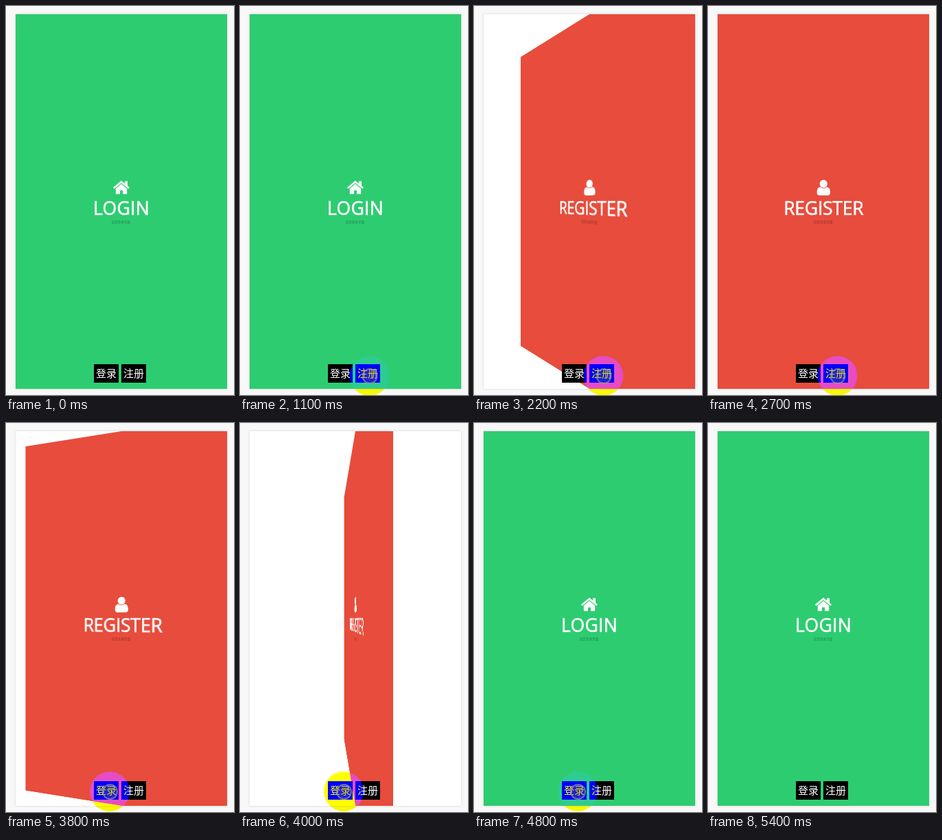
An HTML page for the animation above (6 s loop, 332x568 px).

```html
<!DOCTYPE html>
<html lang="zh">
<head>
<meta charset="utf-8">
<title>Flip card</title>
<style>
  html, body { margin: 0; width: 100%; height: 100%; overflow: hidden; }

  .stage {
    position: relative; width: 332px; height: 568px;
    overflow: hidden; isolation: isolate; background: #f8f8f8;
  }

  .card {
    position: absolute; left: 14px; top: 12px; width: 308px; height: 547px;
    overflow: hidden; perspective: 280px; background: #fff;
    box-shadow: 0 0 3px rgba(0, 0, 0, .16);
  }
  .flipper, .face { position: absolute; inset: 0; }
  .flipper { transform-style: preserve-3d; }
  .face { backface-visibility: hidden; }
  .login { background: #2ecc71; }
  .register { background: #e74c3c; transform: rotateY(180deg); }

  svg { display: block; width: 308px; height: 547px; fill: #fff; }
  text { text-anchor: middle; }
  .title { font: 26.5px "Open Sans", "Noto Sans", sans-serif; stroke: #fff; stroke-width: .6px; }
  .login .title { letter-spacing: .25px; }
  .register .title { letter-spacing: -.25px; }
  .note { font: 4.7px "Noto Sans CJK SC", "Noto Sans CJK", sans-serif; fill: rgba(0, 0, 0, .32); }

  .btn {
    position: absolute; top: 523px; width: 36px; height: 27px;
    background: #000; color: #fff; text-align: center; white-space: nowrap;
    font: 500 15px/26px "Noto Sans CJK SC", "Noto Sans CJK", sans-serif;
  }

  .halo, .ring { position: absolute; border-radius: 50%; box-sizing: border-box; }
  /* Difference with blue: yellow on white, magenta on red, blue on black */
  .halo {
    left: -29px; top: -29px; width: 58px; height: 58px;
    background: #00f; mix-blend-mode: difference;
  }
  .ring {
    left: -11.5px; top: -11.5px; width: 23px; height: 23px;
    border: 2px solid rgba(160, 160, 160, .6);
    background: rgba(110, 110, 110, .3);
  }

  /* Paused animations are positioned by the stepped clock --t */
  .flipper, .halo, .ring {
    animation: 6s linear calc(var(--t, 0) * -1ms) infinite paused;
  }
  .flipper { animation-name: flip; }
  .halo, .ring { animation-name: point; }

  @keyframes flip {
    0%, 28.05% { transform: rotateY(0deg); animation-timing-function: ease; }
    44.717%, 62.2% { transform: rotateY(180deg); animation-timing-function: ease; }
    78.867%, 100% { transform: rotateY(0deg); }
  }
  @keyframes point {
    0% { transform: translate(400px, 540px); animation-timing-function: step-end; }
    11.66% { transform: translate(291px, 540px); animation-timing-function: ease-out; }
    17.5%, 50% { transform: translate(188.5px, 540px); animation-timing-function: ease-in-out; }
    58.33%, 83.33% { transform: translate(151px, 538px); animation-timing-function: ease-in; }
    88.33%, 100% { transform: translate(215px, 602px); }
  }
</style>
</head>
<body>
<div class="stage">
  <div class="card">
    <div class="flipper">
      <div class="face login">
        <svg viewBox="14 12 308 547">
          <path d="M156.8 266 168 256.7 179.2 266" fill="none" stroke="#fff" stroke-width="2.6"/>
          <path d="M173.2 255.8h3.8v8l-3.8-3z"/>
          <path d="M159.8 266.8 168 259.8 176.2 266.8V274.4H170V269.2H166V274.4H159.8z"/>
          <text class="title" x="168" y="305">LOGIN</text>
          <text class="note" x="167.5" y="317">这是登录页面</text>
        </svg>
      </div>
      <div class="face register">
        <svg viewBox="14 12 308 547">
          <ellipse cx="168.2" cy="259.6" rx="5.6" ry="5.9"/>
          <path d="M163.4 264.2Q168.2 268.2 173 264.2C176.6 264.6 178 268 178 272.2Q178 276.4 174 276.4H162.4Q158.6 276.4 158.6 272.2C158.6 268 159.8 264.6 163.4 264.2z"/>
          <text class="title" x="168.3" y="305">REGISTER</text>
          <text class="note" x="167.5" y="317">这是注册页面</text>
        </svg>
      </div>
    </div>
  </div>
  <div class="btn" style="left:128px">登录</div>
  <div class="btn" style="left:168px">注册</div>
  <div class="halo"></div>
  <div class="ring"></div>
</div>
<script>
  const LOOP = 6000, STEP = 100;
  const stage = document.querySelector('.stage');
  const start = performance.now();

  function tick() {
    const t = (performance.now() - start) % LOOP;
    stage.style.setProperty('--t', Math.floor(t / STEP) * STEP);
    requestAnimationFrame(tick);
  }
  tick();
</script>
</body>
</html>
```
